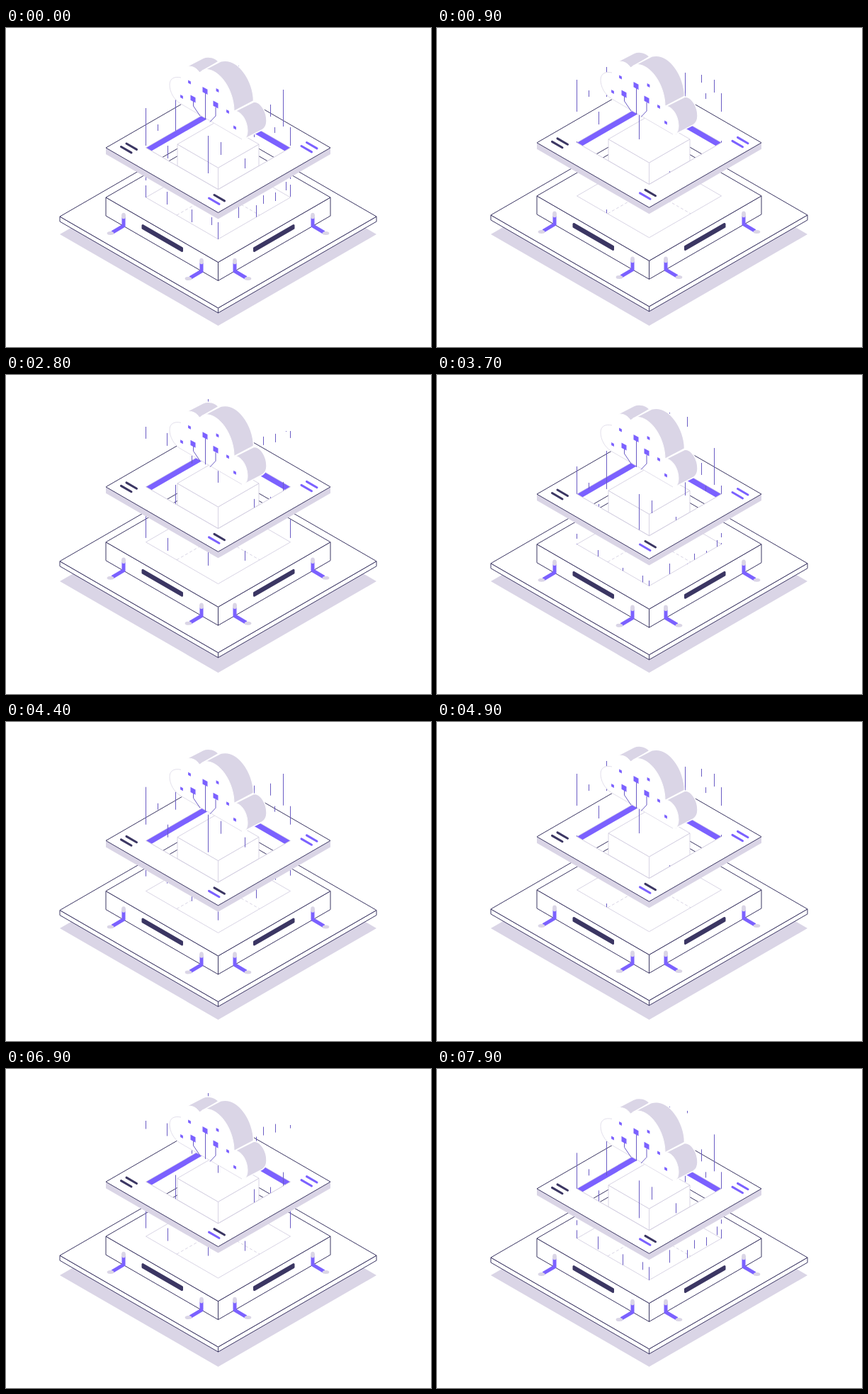
Write an HTML page that moves like this. It is 600 by 450 pixels and loops after 8000 ms.

```html
<!DOCTYPE html>
<html lang="en">
<head>
<meta charset="utf-8">
<title>Cloud platform</title>
<style>
  html, body { margin: 0; width: 100%; height: 100%; overflow: hidden; background: #fff; }
  svg { display: block; width: 600px; height: 450px; }
</style>
</head>
<body>
<svg id="stage" viewBox="0 0 600 450"></svg>
<script>
const DARK = '#3b3663', PURPLE = '#7b61ff', GREY = '#dad5e6', FAINT = '#cfcadd', WIRE = '#6a5cc4';
const CX = 299.5, SLOPE = 0.577, PERIOD = 4000, REPEAT = 213;

const shape = (d, fill = 'none', stroke = 'none', width = 1, extra = '') =>
  `<path d="${d}" fill="${fill}" stroke="${stroke}" stroke-width="${width}" ${extra}/>`;
const poly = (...pts) => 'M' + pts.map(p => p.join(' ')).join('L') + 'Z';
const group = (id, ...parts) => `<g id="${id}">${parts.join('')}</g>`;
const mirror = parts => parts + `<g transform="matrix(-1 0 0 1 ${2 * CX} 0)">${parts}</g>`;

// Corners of an isometric square with side corners at height y
const corners = (y, w) => ({
  left: [CX - w, y], right: [CX + w, y],
  front: [CX, y + w * SLOPE], back: [CX, y - w * SLOPE]
});
const down = ([x, y], h) => [x, y + h];
const rhombus = (y, w) => {
  const c = corners(y, w);
  return poly(c.left, c.back, c.right, c.front);
};
const prism = (y, w, h, stroke, width) => {
  const { left, right, front } = corners(y, w);
  return shape(poly(left, front, right, down(right, h), down(front, h), down(left, h)), '#fff', stroke, width) +
    shape(rhombus(y, w), '#fff', stroke, width) +
    shape(`M${front}v${h}`, 'none', stroke, width);
};

const connector = (x, y) =>
  shape(`M${x} ${y + 2}v12l-16 9.5`, 'none', PURPLE, 5) +
  `<ellipse cx="${x}" cy="${y}" rx="3" ry="4.3" fill="${GREY}"/>` +
  `<ellipse cx="${x - 18.5}" cy="${y + 24.5}" rx="4.8" ry="2.5" fill="${GREY}"/>`;
const slot = shape('M193 278.5L248.500 310.500V314.500L193 282.500Z', DARK, DARK, 3, 'stroke-linejoin="round"');
const dash = (x, y, color) => shape(`M${x} ${y}l14.500 8.400`, 'none', color, 3, 'stroke-linecap="round"');
const chip = (x, y, s) =>
  shape(poly([x - s, y - s * 1.6], [x + s, y - s * 0.5], [x + s, y + s * 1.6], [x - s, y + s * 0.5]), PURPLE);

const P = corners(169, 158.5), H = corners(169, 102);

const base = group('base',
  prism(266, 223.5, 7, DARK, 1),
  prism(239, 158.5, 26, DARK, 1),
  mirror(slot + connector(166, 265) + connector(276, 329)),
  shape(rhombus(239, 102), 'none', FAINT, 0.8),
  shape('M241 264L299.500 230.300L358 264', 'none', FAINT, 0.8, 'stroke-dasharray="4 3"'));

const plateBack = group('plateBack',
  shape(poly(P.left, P.back, P.right, H.right, H.back, H.left), '#fff'),
  shape(`M${P.left}L${P.back}L${P.right}`, 'none', DARK),
  mirror(shape(poly(H.left, H.back, down(H.back, 9), [H.left[0] + 7.8, 173.5]), PURPLE)),
  shape(rhombus(169, 102), 'none', FAINT, 0.6),
  prism(164, 57.5, 30.4, FAINT, 0.8));

const plateFront = group('plateFront',
  shape(poly(P.left, P.front, P.right, down(P.right, 9), down(P.front, 9), down(P.left, 9)), GREY),
  shape(poly(P.left, P.front, P.right, H.right, H.front, H.left), '#fff'),
  shape(`M${P.left}L${P.front}L${P.right}`, 'none', DARK),
  shape(`M${H.left}L${H.front}L${H.right}`, 'none', FAINT, 0.8),
  dash(162.5, 167.5, DARK), dash(170, 163, DARK),
  dash(417, 166.5, PURPLE), dash(424.5, 161.5, PURPLE),
  dash(286.5, 240, PURPLE), dash(294, 235.5, DARK));

const face = 'M247 70C246 60 251 54 258 54C265 54 271 58 273.500 64C276 60 280 58.500 284 58.500' +
  'C304 60 322 90 322 117C333 117 341 132 341 145C341 153 338 157 333 157' +
  'L246 106.500C237 101 231 90 231 80C231 71 238 68 247 70Z';
const cloud = group('cloud',
  ['M251 56.500L278 42.500C286 39 296 42 300 47.500L273.500 63Z',
   'M277 60.500L303 47C328 41 349.500 75 349.500 103L322 117.500Z',
   'M322 118L350 104C360 104 368 118 368 131C368 137 366 141 362 143.500L336 157Z'
  ].map(d => shape(d, GREY, '#fff', 1.5)).join(''),
  shape(face, '#fff', '#fff', 1),
  shape('M247 70C238 68 231 71 231 80C231 90 237 101 246 106.500L333 157', 'none', FAINT, 0.6),
  shape('M264.500 103v7l9.500 14M281.500 92v37M296 112v12l-8 8.500', 'none', WIRE),
  [[259, 76.5], [248, 97], [298.5, 88], [313, 118], [323, 140.5]].map(p => chip(...p, 1.9)).join(''),
  [[281, 88.5], [264, 100], [296, 108]].map(p => chip(...p, 3.5)).join(''));

const stage = document.getElementById('stage');
stage.innerHTML =
  shape(rhombus(291, 223.5), GREY) + base + plateBack +
  `<path id="beams" fill="none" stroke="${WIRE}"/>` + plateFront + cloud;

// x, upper limit, then top and length of each dash at time zero
const beams = [
  [197, 73, 113, 53, 208, 7, 222, 17], [214, 73, 136, 9], [227, 73, 231, 18], [228, 73, 166, 18],
  [239, 55, 91, 54], [262, 90, 256, 18], [285, 34, 152, 53], [290, 90, 267, 11],
  [299, 90, 274, 27], [303, 60, 161, 18], [328, 53, 250, 18], [337, 90, 184, 14],
  [350, 53, 111, 43], [353, 59, 250, 20], [363, 66, 236, 12], [373, 66, 108, 17],
  [379, 73, 140, 8], [380, 73, 232, 12], [391, 73, 87, 52], [395, 79, 217, 12],
  [401, 79, 140, 26, 207, 6, 221, 17]
];

function beamPath(t, lift) {
  const rise = t / PERIOD * REPEAT;
  let d = '';
  for (const [x, limit, ...dashes] of beams) {
    const floor = 239 + (102 - Math.abs(x + 0.5 - CX)) * SLOPE + lift;
    for (let i = 0; i < dashes.length; i += 2)
      for (const wrap of [-REPEAT, 0, REPEAT]) {
        const y = dashes[i] - rise + wrap;
        const top = Math.max(y, limit), end = Math.min(y + dashes[i + 1], floor);
        if (end > top) d += `M${x + 0.5} ${top}V${end}`;
      }
  }
  return d;
}

const el = id => document.getElementById(id);
const move = (id, y) => el(id).setAttribute('transform', `translate(0 ${y})`);
const wave = t => Math.cos(2 * Math.PI * t / PERIOD);

function draw(now) {
  const t = Math.floor(now / 100) * 100 % PERIOD;
  const bob = (wave(t) - 1) / 2;
  move('base', 5 * bob);
  move('plateBack', 17 * bob);
  move('plateFront', 17 * bob);
  move('cloud', 5.5 * (wave(t + 400) - wave(400)));
  el('beams').setAttribute('d', beamPath(t, 5 * bob));
}

let start;
function tick(now) {
  start ??= now;
  draw(now - start);
  requestAnimationFrame(tick);
}
draw(0);
requestAnimationFrame(tick);
</script>
</body>
</html>
```
